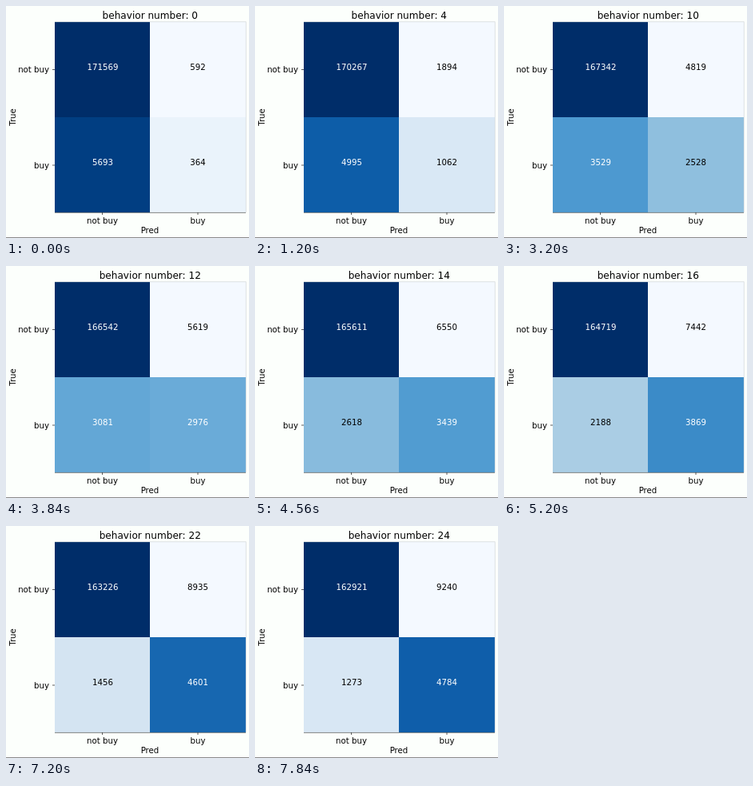
Recreate the animation shown at these times as an HTML page. Size 304x290 px, loop 8000 ms.

```html
<!DOCTYPE html>
<html lang="en">
<head>
<meta charset="utf-8">
<title>Confusion matrix</title>
<style>
  html, body { margin: 0; width: 100%; height: 100%; overflow: hidden; background: #fcfffc; }
  svg { display: block; width: 100%; height: 100%; }
  text { font: 10.2px "DejaVu Sans", sans-serif; text-anchor: middle; }
  .title { font-size: 12.1px; }
  .end { text-anchor: end; }
  .ticks { stroke: #333; stroke-width: .8; }
</style>
</head>
<body>
<svg viewBox="0 0 304 290">
  <g id="cells"></g>
  <path class="ticks" d="M58 79.5H61M58 199H61M120.5 258V261M240 258V261"/>
  <path d="M61 258.4H300" stroke="#333" stroke-width=".6"/>
  <path d="M61 19.7H300.3V258" fill="none" stroke="#c9ced2" stroke-width=".6"/>
  <text class="title" id="title" x="180.3" y="16"></text>
  <text class="end" x="54" y="83.3">not buy</text>
  <text class="end" x="54" y="202.8">buy</text>
  <text x="120.5" y="272">not buy</text>
  <text x="240" y="272">buy</text>
  <text x="180" y="284">Pred</text>
  <text transform="translate(11.5 139) rotate(-90)">True</text>
  <path d="M0 289.5H304" stroke="#8a8a8a"/>
</svg>
<script>
const LOOP = 8000, NEGATIVES = 172161, POSITIVES = 6057;
// [behavior number, false positives, true positives]
const KEYS = [[0, 592, 364], [4, 1894, 1062], [10, 4819, 2528], [12, 5619, 2976],
              [16, 7442, 3869], [19, 8407, 4305], [24, 9240, 4784]];
const BLUES = ['f4f9ff', 'deebf7', 'cfe1f0', 'a0c8e1', '66a9d7', '4292cd', '2171b8', '0352a0', '002d69']
  .map(hex => [0, 2, 4].map(i => parseInt(hex.slice(i, i + 2), 16)));

const byId = id => document.getElementById(id);
const lerp = (a, b, u) => a + (b - a) * u;

function colour(v) {
  const x = v * (BLUES.length - 1), i = Math.min(Math.floor(x), BLUES.length - 2);
  return `rgb(${BLUES[i].map((c, k) => Math.round(lerp(c, BLUES[i + 1][k], x - i)))})`;
}

// Smooth curve through the key counts
function count(n, col) {
  let i = 0;
  while (i < KEYS.length - 2 && n >= KEYS[i + 1][0]) i++;
  const slope = j => {
    const a = KEYS[Math.max(j - 1, 0)], b = KEYS[Math.min(j + 1, KEYS.length - 1)];
    return (b[col] - a[col]) / (b[0] - a[0]);
  };
  const [p, q] = [KEYS[i], KEYS[i + 1]], h = q[0] - p[0], u = (n - p[0]) / h, w = 1 - u;
  return Math.round(p[col] * (1 + 2 * u) * w * w + q[col] * u * u * (3 - 2 * u)
    + h * u * w * (slope(i) * w - slope(i + 1) * u));
}

function add(tag, attrs) {
  const el = document.createElementNS('http://www.w3.org/2000/svg', tag);
  for (const key in attrs) el.setAttribute(key, attrs[key]);
  return byId('cells').appendChild(el);
}

const cells = [[61, 20], [180, 20], [61, 139], [180, 139]].map(([x, y]) => ({
  rect: add('rect', { x, y, width: x > 61 ? 120 : 119, height: 119, 'shape-rendering': 'crispEdges' }),
  label: add('text', { x: x > 61 ? 240 : 121, y: y + 60.3 })
}));

function show(n) {
  const fp = count(n, 1), tp = count(n, 2);
  const counts = [NEGATIVES - fp, fp, POSITIVES - tp, tp];
  const rates = counts.map((c, i) => c / (i < 2 ? NEGATIVES : POSITIVES));
  const min = Math.min(...rates), max = Math.max(...rates);
  cells.forEach(({ rect, label }, i) => {
    rect.setAttribute('fill', colour((rates[i] - min) / (max - min)));
    label.setAttribute('fill', rates[i] > max / 2 ? '#fff' : '#000');
    label.textContent = counts[i];
  });
  byId('title').textContent = `behavior number: ${n}`;
}

// Steps last 320 ms, every sixth one 400 ms
function stepAt(t) {
  let n = 0;
  for (let next = 240; t >= next; next += n % 6 ? 320 : 400) n++;
  return n;
}

let shown = -1;
function tick() {
  const n = stepAt(performance.now() % LOOP);
  if (n !== shown) show(shown = n);
  requestAnimationFrame(tick);
}
tick();
</script>
</body>
</html>
```
